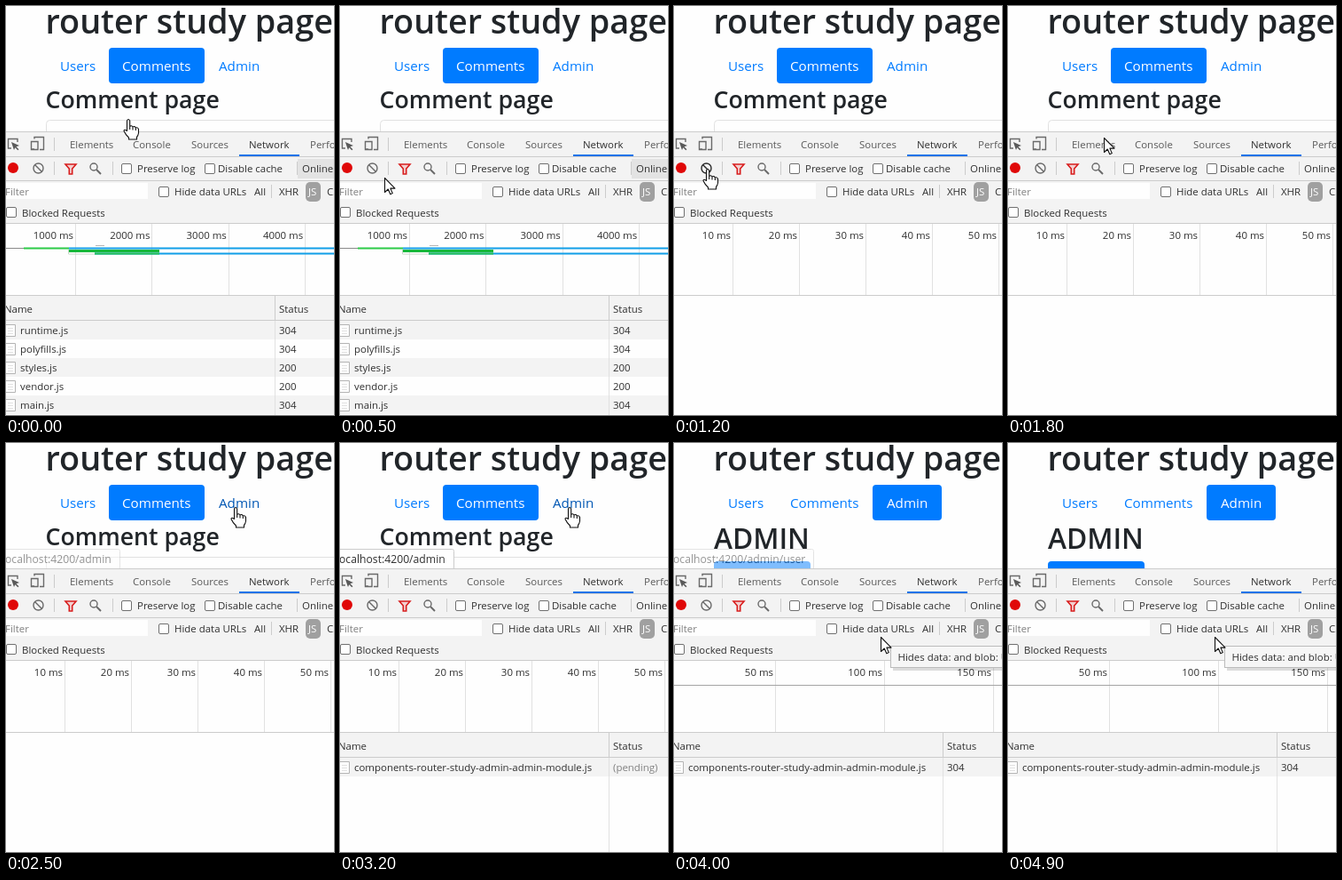
Recreate the animation shown at these times as an HTML page. Size 370 by 460 pixels, loop 5000 ms.

```html
<!DOCTYPE html>
<html lang="en">
<head>
<meta charset="utf-8">
<style>
  html, body { margin: 0; width: 100%; height: 100%; overflow: hidden; background: #fefefe; }
  svg { display: block; }
  text { font: 11.45px "Open Sans", "Noto Sans", sans-serif; fill: #303030; white-space: pre; }
  .h { font-weight: 600; fill: #212529; }
  .nav { font-size: 15.2px; fill: #007bff; }
  .on { fill: #fff; }
  .tab { fill: #5a5a5a; }
  .end { text-anchor: end; }
  .bar { fill: #f3f3f3; }
  .line { stroke: #ccc; fill: none; }
  .grid { stroke: #e1e1e1; fill: none; }
  .icon { stroke: #6a6a6a; stroke-width: 1.4; fill: none; }
  .box { fill: #fefefe; stroke: #707070; }
</style>
</head>
<body>
<svg width="370" height="460" viewBox="0 0 370 460">
  <rect width="370" height="460" fill="#fefefe"/>

  <!-- page -->
  <text class="h" x="44.500" y="31" style="font-size:37.8px">router study page</text>
  <rect id="pill" y="47" height="40" rx="4" fill="#007bff"/>
  <text class="nav" x="61" y="73">Users</text>
  <text class="nav" id="comments" x="131" y="73">Comments</text>
  <text class="nav" id="admin" x="240" y="73">Admin</text>
  <g id="commentPage">
    <text class="h" x="44.500" y="115" style="font-size:26.7px">Comment page</text>
    <rect class="grid" x="45.5" y="128.5" width="340" height="40" rx="4"/>
  </g>
  <g id="adminPage">
    <text class="h" x="45" y="119" style="font-size:31.7px">ADMIN</text>
    <rect x="45" y="133" width="109" height="38" rx="4" fill="#007bff"/>
  </g>
  <g id="status">
    <rect id="statusBox" class="line" x="-5" y="119.5" height="30" rx="2" style="fill:#fefefe"/>
    <text id="statusText" x="-1" y="135" style="font-size:12.2px"></text>
  </g>

  <!-- developer panel -->
  <rect class="bar" y="141" width="370" height="104"/>
  <path class="line" d="M0 141.5H370M0 169.5H370M0 196.5H370M0 244.5H370M54.5 148V163M54.5 175V190M120.5 175V190M328.5 175V190M299.5 201V216"/>
  <rect x="263" y="167" width="68" height="2" fill="#1a73e8"/>
  <path class="icon" d="M6 160H2.5V149.500H13V153M32 161H28.500V156M32 149.500V147.500H42.500V161.500H38M28.500 152.500H36V161.500H28.500Z"/>
  <path d="M6 153L15 157L11.500 158.200L14.500 161.300L13.300 162.300L10.300 159.300L9 162Z" fill="#5a5a5a"/>
  <circle cx="8" cy="182" r="6" fill="#e00808"/>
  <g id="clear" class="icon"><circle cx="36.500" cy="182.500" r="5.500"/><path d="M32.500 178.500L40.500 186.500"/></g>
  <path d="M67 178H79L74.700 183V189H71.300V183Z" fill="#f3d0d0" stroke="#d81e1e" stroke-width="1.600"/>
  <g class="icon"><circle cx="99" cy="181" r="4"/><path d="M102 184L107 189" stroke-width="2"/></g>
  <g id="checks"></g>
  <rect id="online" x="329" y="172" width="41" height="22" fill="#e3e3e3"/>
  <rect y="199" width="160" height="18" fill="#fefefe"/>
  <rect x="338" y="198" width="17" height="22" rx="5" fill="#a0a0a0"/>
  <g id="labels"></g>

  <g id="timeline"></g>
  <g id="busy" fill="none">
    <path d="M0 272.500H20" stroke="#8a8a8a"/>
    <path d="M20 272.500H71" stroke="#2ccb48" stroke-width="2"/>
    <path d="M71 272.500H370M100 278.500H370" stroke="#129fe8" stroke-width="2"/>
    <path d="M71 275.500H173" stroke="#18b83c" stroke-width="3"/>
    <path d="M70.500 274V279H100" stroke="#c8d8c8"/>
    <path d="M100 278.500H173" stroke="#1fbf50" stroke-width="2"/>
    <path d="M101 269.500H111" stroke="#b5b5b5"/>
  </g>
  <path id="idle" d="M0 272.500H370" stroke="#a5a5a5"/>
  <path class="line" d="M0 325.500H370"/>
  <g id="table"></g>

  <g id="tip">
    <rect x="247" y="231" width="140" height="25" fill="#00000022"/>
    <rect class="line" x="244.500" y="228.500" width="140" height="24" style="fill:#f6f6f6;stroke:#bbb"/>
    <text x="252.500" y="245">Hides data: and blob: URLs</text>
  </g>

  <g id="cursor" fill="#fff" stroke="#111" stroke-width="1.100" stroke-linejoin="round">
    <path id="arrow" d="M.5 .5V16.500L4.300 13L6.800 18.700L9.300 17.600L6.900 12.100H12Z"/>
    <path id="hand" d="M-1.500 2Q0 -1 1.700 2V8.500Q3.500 6.700 5 9Q7 7.500 8.300 10Q10.500 9 11.500 11.500V16Q11 19 9.500 20.500V23H.5V21Q-3 18 -5 13.500Q-5 11 -1.500 13.500ZM1.700 8.500V12M5 9V12.500M8.300 10V13"/>
  </g>
</svg>

<script>
const $ = id => document.getElementById(id);
const show = (id, on) => $(id).style.display = on ? "" : "none";
const label = (s, x, y, cls = "", fill = "") =>
  `<text class="${cls}" x="${x}" y="${y}"${fill && ` style="fill:${fill}"`}>${s}</text>`;

$("checks").innerHTML = [[130, 177], [224, 177], [172, 203], [0, 226]].map(([x, y]) =>
  `<rect class="box" x="${x + .5}" y="${y + .5}" width="11" height="11" rx="1.500"/>`).join("");

$("labels").innerHTML = [
  ["Elements", 72, 160, "tab"], ["Console", 143, 160, "tab"], ["Sources", 209, 160, "tab"],
  ["Network", 274, 160], ["Performance", 343, 160, "tab"],
  ["Preserve log", 148, 187], ["Disable cache", 239, 187], ["Online", 334, 187],
  ["Filter", -1, 213, "", "#808080"], ["Hide data URLs", 190, 213], ["All", 280, 213],
  ["XHR", 308, 213], ["JS", 341, 213, "", "#fff"], ["CSS", 362, 213],
  ["Blocked Requests", 18, 237]
].map(a => label(...a)).join("");

function ruler(first, gap, step) {
  let out = "";
  for (let i = 0, x = first; x < 370; i++, x += gap)
    out += `<path class="grid" d="M${Math.round(x) + .5} 245V325"/>` +
      label((i + 1) * step + " ms", x - 2, 262, "end");
  return out;
}

function table(rows) {
  if (!rows.length) return "";
  const body = rows.map(([name, code], i) => {
    const y = 354 + 21 * i;
    return (i % 2 ? "" : `<rect class="bar" y="${y}" width="370" height="21"/>`) +
      `<path class="box" style="stroke:#b4b4b4" d="M-1 ${y + 4.5}H10.500V${y + 17.500}H-1"/>` +
      `<path class="grid" d="M2 ${y + 8.500}H8M2 ${y + 11.500}H8M2 ${y + 14.500}H8"/>` +
      label(name, 16, y + 15) + label(code, 308, y + 15, "", isNaN(code) ? "#808080" : "");
  }).join("");
  return `<rect class="bar" y="326" width="370" height="28"/>${body}
    <path class="grid" d="M303.500 354V460"/><path class="line" d="M0 353.500H370M303.500 326V354"/>` +
    label("Name", -2, 345) + label("Status", 308, 345);
}

const module = "components-router-study-admin-admin-module.js";
const CLEAR = 1000, PENDING = 3100, LOADED = 3400;
const phases = [
  { from: 0, ruler: [78, 86.4, 1000], rows: [["runtime.js", 304], ["polyfills.js", 304],
    ["styles.js", 200], ["vendor.js", 200], ["main.js", 304]] },
  { from: CLEAR, ruler: [66, 75, 10], rows: [] },
  { from: PENDING, ruler: [66, 75, 10], rows: [[module, "(pending)"]] },
  { from: LOADED, ruler: [114, 123, 50], rows: [[module, 304]] }
];

// time, x, y of the pointer tip
const path = [[0, 138, 127], [100, 138, 127], [500, 50, 193], [800, 38, 183], [1500, 38, 183],
  [2300, 259, 72], [3300, 259, 72], [3500, 148, 136], [3700, 233, 218], [5000, 233, 218]];

function pointer(t) {
  const i = path.findIndex(p => p[0] > t);
  const [t0, x0, y0] = path[i - 1], [t1, x1, y1] = path[i];
  const k = (t - t0) / (t1 - t0), e = k * k * (3 - 2 * k);
  return [x0 + (x1 - x0) * e, y0 + (y1 - y0) * e];
}

const ramp = (t, a, b) => Math.min(1, Math.max(0, (t - a) / (b - a)));
let current;

function draw(t) {
  const phase = phases.findLast(p => t >= p.from);
  if (phase !== current) {
    current = phase;
    $("timeline").innerHTML = ruler(...phase.ruler);
    $("table").innerHTML = table(phase.rows);
  }
  const loaded = t >= LOADED;
  show("busy", t < CLEAR);
  show("online", t < CLEAR);
  show("idle", loaded);
  show("commentPage", !loaded);
  show("adminPage", loaded);
  show("tip", t >= 3900);
  $("pill").setAttribute("x", loaded ? 224 : 116);
  $("pill").setAttribute("width", loaded ? 78 : 108);
  $("comments").classList.toggle("on", !loaded);
  $("admin").classList.toggle("on", loaded);

  const [x, y] = pointer(t);
  const onClear = x < 46 && y > 170;
  const onAdmin = x > 230 && y < 88;
  const onButton = loaded && x < 154 && y < 142;
  const hand = t < 150 || onClear || onAdmin || onButton;
  $("cursor").setAttribute("transform", `translate(${Math.round(x)} ${Math.round(y)})`);
  show("hand", hand);
  show("arrow", !hand);
  $("clear").style.stroke = onClear ? "#2a2a2a" : "";
  $("admin").style.fill = onAdmin && !loaded ? "#0056b3" : "";

  const user = t >= 3500;
  $("statusText").textContent = "ocalhost:4200/admin" + (user ? "/user" : "");
  $("statusBox").setAttribute("width", user ? 162.5 : 133.5);
  $("status").style.opacity = ramp(t, 2300, 2700) * (1 - ramp(t, 3800, 4200));
}

function frame(now) {
  draw(Math.floor(now % 5000 / 100) * 100);
  requestAnimationFrame(frame);
}
draw(0);
requestAnimationFrame(frame);
</script>
</body>
</html>
```
